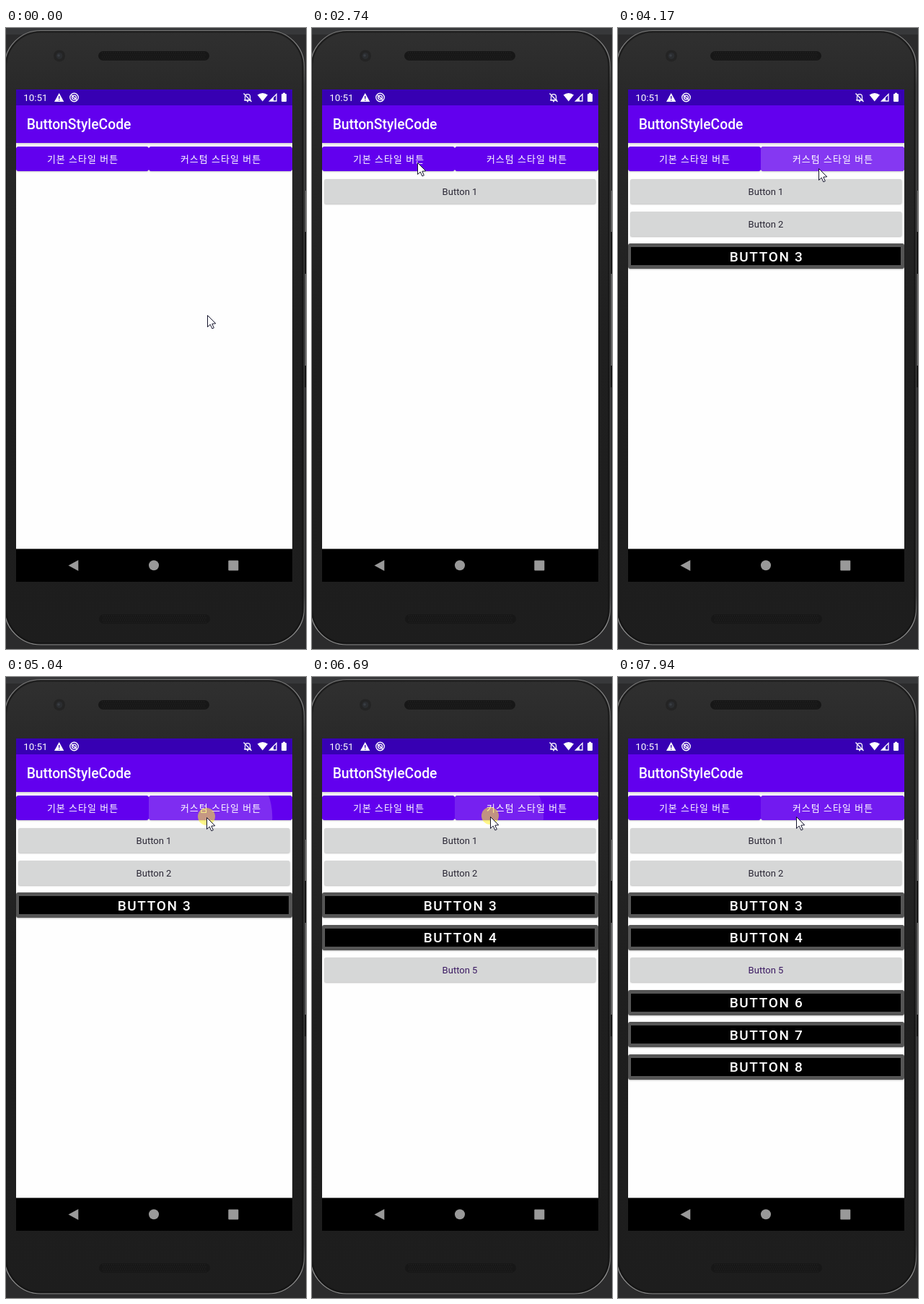
Write an HTML page with a canvas that moves like this. It is 416 px wide and 859 px high and loops after 8 s.

```html
<!DOCTYPE html>
<html lang="ko">
<head>
<meta charset="utf-8">
<title>ButtonStyleCode</title>
<style>
html, body { margin: 0; width: 100%; height: 100%; overflow: hidden; background: #2b2b2b; }
canvas { display: block; width: 416px; height: 859px; }
</style>
</head>
<body>
<canvas id="stage"></canvas>
<script>
const W = 416, H = 859, LOOP = 8000;
const canvas = document.getElementById('stage');
const scale = window.devicePixelRatio || 1;
canvas.width = W * scale;
canvas.height = H * scale;
const ctx = canvas.getContext('2d');
const FONT = 'Roboto, "Noto Sans CJK KR", "Noto Sans CJK", sans-serif';
const PURPLE = '#6200ee';

const LEFT = { x: 14, y: 164, w: 184, h: 34, label: '기본 스타일 버튼', cx: 106 };
const RIGHT = { x: 198, y: 164, w: 199, h: 34, label: '커스텀 스타일 버튼', cx: 297.5 };

// Each press adds one row; the side decides its style.
const PRESSES = [
  [2340, LEFT], [3270, LEFT], [4030, RIGHT], [4970, RIGHT],
  [5945, LEFT], [6640, RIGHT], [7110, RIGHT], [7690, RIGHT]
].map(([at, side]) => ({ at, side }));
const HOLD = 110, ADD_DELAY = 135, FADE = 240;

// Pointer path: time, x, y
const PATH = [
  [850, 279, 397], [1620, 166, 224], [1690, 156, 215], [2180, 146, 186],
  [3500, 146, 186], [3830, 278, 194], [5340, 278, 194], [5850, 184, 195],
  [6200, 184, 195], [6540, 247, 193]
];

const clamp = v => Math.max(0, Math.min(1, v));

function pointerAt(t) {
  if (t <= PATH[0][0]) return PATH[0].slice(1);
  for (let i = 1; i < PATH.length; i++) {
    const [t0, x0, y0] = PATH[i - 1], [t1, x1, y1] = PATH[i];
    if (t < t1) {
      let p = (t - t0) / (t1 - t0);
      if (i === 1) p = p * (0.6 + 0.4 * p);
      else if (i === 3) p = 1 - (1 - p) ** 2;
      else if (i > 3) p = p * p * (3 - 2 * p);
      return [x0 + (x1 - x0) * p, y0 + (y1 - y0) * p];
    }
  }
  return PATH[PATH.length - 1].slice(1);
}

function box(x, y, w, h, r, fill) {
  ctx.beginPath();
  ctx.roundRect(x, y, w, h, r);
  ctx.fillStyle = fill;
  ctx.fill();
}

function disc(x, y, r, fill) {
  ctx.beginPath();
  ctx.arc(x, y, r, 0, 7);
  ctx.fillStyle = fill;
  ctx.fill();
}

function poly(points, fill, stroke, width = 1) {
  ctx.beginPath();
  points.forEach(([x, y]) => ctx.lineTo(x, y));
  ctx.closePath();
  if (fill) { ctx.fillStyle = fill; ctx.fill(); }
  if (stroke) { ctx.strokeStyle = stroke; ctx.lineWidth = width; ctx.stroke(); }
}

function line(x0, y0, x1, y1, color, width) {
  ctx.beginPath();
  ctx.moveTo(x0, y0);
  ctx.lineTo(x1, y1);
  ctx.strokeStyle = color;
  ctx.lineWidth = width;
  ctx.stroke();
}

function text(str, x, y, size, weight, color, align = 'left', spacing = 0) {
  ctx.font = `${weight} ${size}px ${FONT}`;
  ctx.letterSpacing = spacing + 'px';
  ctx.textAlign = align;
  ctx.fillStyle = color;
  ctx.fillText(str, x + (align === 'center' ? spacing / 2 : 0), y);
  ctx.letterSpacing = '0px';
}

function shadowed(blur, dy, color, draw) {
  ctx.save();
  ctx.shadowColor = color;
  ctx.shadowBlur = blur * scale;
  ctx.shadowOffsetY = dy * scale;
  draw();
  ctx.restore();
}

function gradient(y0, y1, stops) {
  const g = ctx.createLinearGradient(0, y0, 0, y1);
  stops.forEach(([at, color]) => g.addColorStop(at, color));
  return g;
}

function speaker(x, y) {
  box(x, y, 154, 13, 6.5, '#171717');
  ctx.fillStyle = '#292929';
  for (let r = 0; r < 4; r++)
    for (let c = 0; c < 48; c++)
      ctx.fillRect(x + 5 + c * 3 + (r % 2) * 1.5, y + 1.5 + r * 3, 1, 1);
}

function phone() {
  ctx.fillStyle = '#2b2b2c';
  ctx.fillRect(0, 0, W, H);
  ctx.fillStyle = '#37383a';
  ctx.fillRect(0, 0, W, 9);
  box(-2, 3.5, 415.5, 849.5, 50,
    gradient(3, 853, [[0, '#303030'], [0.1, '#292929'], [0.5, '#1f1f1f'], [1, '#1d1d1d']]));
  // The rim catches light around the corners.
  ctx.strokeStyle = gradient(3, 853,
    [[0, '#777'], [0.035, '#888'], [0.09, '#4a4a4a'], [0.92, '#4a4a4a'], [0.97, '#999'], [1, '#888']]);
  ctx.lineWidth = 1.2;
  ctx.stroke();
  ctx.beginPath();
  ctx.roundRect(0, 5.5, 411.5, 845.5, 48);
  ctx.strokeStyle = 'rgba(18,18,18,.6)';
  ctx.lineWidth = 2;
  ctx.stroke();
  box(415, 225, 1, 272, 0, '#777');
  box(414, 282, 2, 58, 0, '#111');
  box(414, 467, 2, 30, 0, '#111');
  speaker(128, 32);
  speaker(129, 811);
  disc(74, 38.5, 8, '#242424');
  disc(74, 38.5, 4.5, '#2b2d30');
  disc(73, 38, 1.8, '#393e43');
}

function statusBar() {
  const white = '#fff', bar = '#3700b3';
  box(14, 85, 383, 22, 0, bar);
  text('10:51', 24.2, 101, 13.4, 400, white);
  poly([[73.7, 90], [80.3, 102], [67, 102]], white);
  line(73.7, 94, 73.7, 98, bar, 1.3);
  line(73.7, 99.2, 73.7, 100.6, bar, 1.3);

  ctx.beginPath();
  ctx.arc(94.5, 96, 5.7, 0, 7);
  ctx.strokeStyle = white;
  ctx.lineWidth = 1.4;
  ctx.stroke();
  ctx.beginPath();
  ctx.arc(94.5, 96, 2.9, 0, 7);
  ctx.stroke();
  line(91, 93, 98, 99.5, white, 1.5);

  ctx.beginPath();
  ctx.moveTo(331.5, 99.8);
  ctx.lineTo(331.5, 95);
  ctx.bezierCurveTo(331.5, 90.5, 338.5, 90.5, 338.5, 95);
  ctx.lineTo(338.5, 99.8);
  ctx.closePath();
  ctx.strokeStyle = white;
  ctx.lineWidth = 1.2;
  ctx.stroke();
  line(330, 99.8, 340, 99.8, white, 1.2);
  line(329.5, 90.5, 340.5, 102, white, 1.3);
  disc(335, 101.5, 1.1, white);

  ctx.beginPath();
  ctx.moveTo(355.8, 101.5);
  ctx.lineTo(348.6, 92.6);
  ctx.quadraticCurveTo(355.8, 87.4, 363, 92.6);
  ctx.closePath();
  ctx.fillStyle = white;
  ctx.fill();
  poly([[375, 91.5], [375, 101], [365.5, 101]], null, white, 1.3);
  poly([[371, 95.5], [371, 101], [365.5, 101]], white);
  box(382, 91, 7, 11, 1, white);
  box(384, 89.7, 3, 2, 0, white);
}

function screen() {
  box(14, 107, 383, 614, 0, '#fefefe');
  ctx.save();
  ctx.beginPath();
  ctx.rect(14, 107, 383, 614);
  ctx.clip();
  shadowed(3, 1, 'rgba(0,0,0,.25)', () => box(14, 107, 383, 52, 0, PURPLE));
  ctx.restore();
  statusBar();
  text('ButtonStyleCode', 28.7, 140, 19.3, 500, '#fff');
  box(14, 720.5, 383, 45.5, 0, '#000');
  poly([[86.5, 743.5], [100.3, 736], [100.3, 751]], '#999');
  disc(205, 743.3, 7, '#999');
  box(308.3, 736.5, 14, 14, 1, '#999');
}

function ripple(press, t) {
  const dt = t - press.at;
  if (dt < 0 || dt > HOLD + FADE) return;
  const b = press.side;
  const [px, py] = pointerAt(press.at);
  const fade = 1 - clamp((dt - HOLD) / FADE);
  ctx.save();
  ctx.beginPath();
  ctx.roundRect(b.x, b.y, b.w, b.h, 4);
  ctx.clip();
  const alpha = 0.25 * clamp(dt / 100) * fade;
  disc(px, py, 30 + 190 * clamp(dt / 220), `rgba(255,255,255,${alpha})`);
  ctx.restore();
}

function topButtons(t) {
  const sides = [LEFT, RIGHT];
  sides.forEach(b => shadowed(2, 1, 'rgba(0,0,0,.22)', () => box(b.x, b.y, b.w, b.h, 4, PURPLE)));
  sides.forEach(b => box(b.x, b.y, b.w, b.h, 4, PURPLE));
  PRESSES.forEach(p => ripple(p, t));
  sides.forEach(b => text(b.label, b.cx, 186, 12.9, 500, '#fff', 'center', 1.1));
}

function row(i, custom) {
  const y = 209 + 44.7 * i, top = Math.round(y), label = i + 1;
  if (custom) {
    shadowed(2, 1, 'rgba(0,0,0,.25)', () => box(14, top, 383, 35, 3, '#555'));
    box(18, top + 5, 374, 25, 0, '#000');
    text('BUTTON ' + label, 205.2, y + 24.3, 19, 500, '#fff', 'center', 1.65);
  } else {
    shadowed(2, 1, 'rgba(0,0,0,.25)', () => box(17, top, 376.5, 34, 2.5, '#d6d7d7'));
    text('Button ' + label, 205, y + 22.2, 13, 400, i === 4 ? '#3b1a62' : '#2a2735', 'center');
  }
}

function pointer(t) {
  const [x, y] = pointerAt(t);
  if (PRESSES.some(p => t >= p.at && t < p.at + HOLD))
    disc(x, y - 1, 12, 'rgba(255,240,40,.55)');
  const shape = [[0, 0], [0, 16], [3.7, 12.6], [6.4, 18.4], [8.8, 17.3], [6.3, 11.7], [11.3, 11.3]];
  poly(shape.map(([dx, dy]) => [x + dx + 0.5, y + dy + 0.5]), '#fff', '#14142c', 1);
}

function draw(t) {
  ctx.setTransform(scale, 0, 0, scale, 0, 0);
  phone();
  screen();
  topButtons(t);
  PRESSES.forEach((p, i) => {
    if (t >= p.at + ADD_DELAY) row(i, p.side === RIGHT);
  });
  pointer(t);
}

const start = performance.now();
function tick() {
  draw((performance.now() - start) % LOOP);
  requestAnimationFrame(tick);
}
tick();
</script>
</body>
</html>
```
